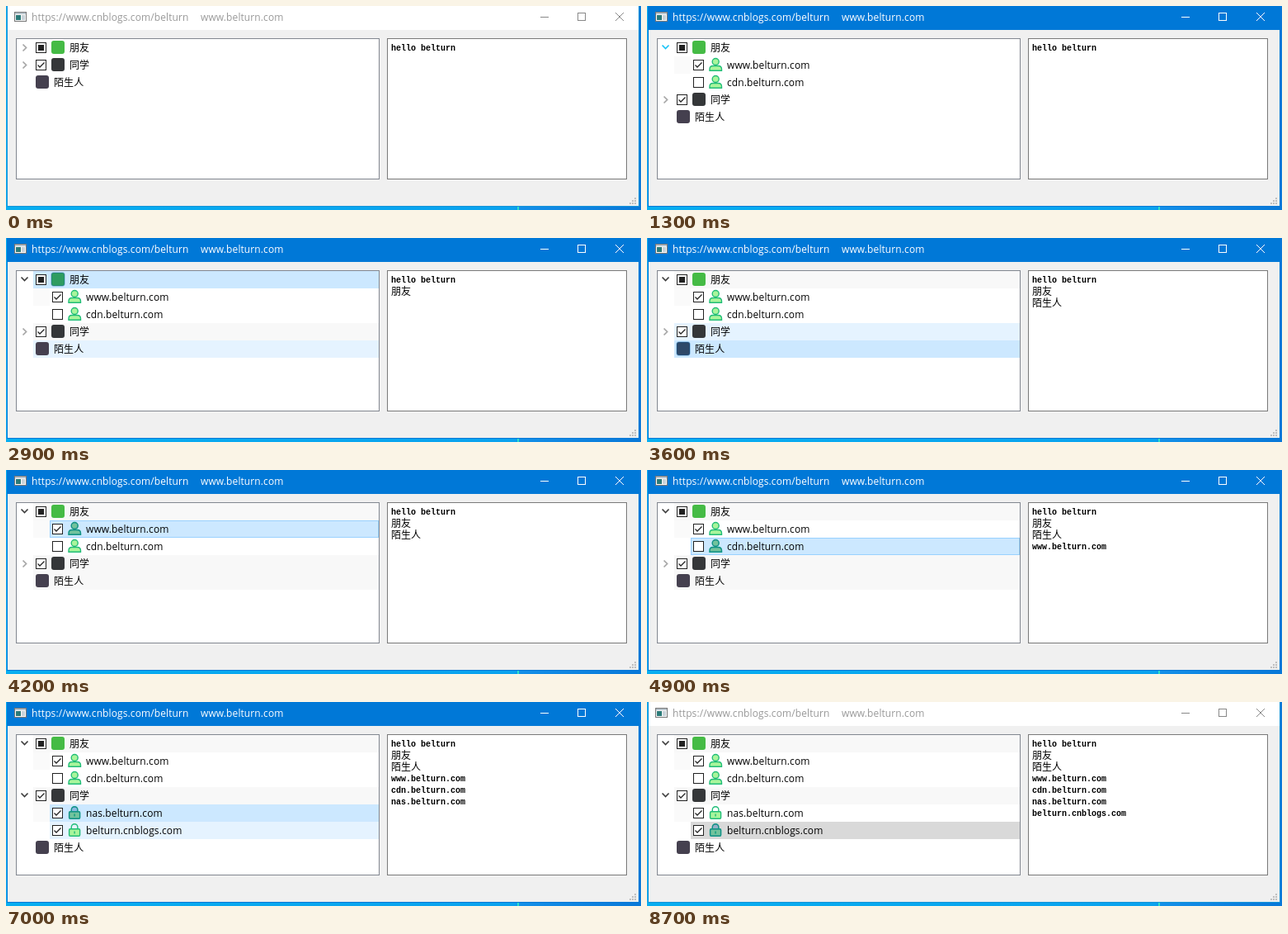
An HTML page with a canvas for the animation above (8800 ms loop, 770 by 247 pixels).

```html
<!DOCTYPE html>
<html lang="zh">
<head>
<meta charset="utf-8">
<style>
html, body { margin: 0; width: 100%; height: 100%; overflow: hidden; }
canvas { display: block; }
</style>
</head>
<body>
<canvas id="stage" width="770" height="247"></canvas>
<script>
const ctx = document.getElementById('stage').getContext('2d');
const LOOP = 8800, ROW = 21;
const UI_FONT = '12px "Open Sans", "Noto Sans CJK SC", "Noto Sans CJK", sans-serif';
const LOG_FONT = 'bold 10px "Liberation Mono", monospace';
const LOG_CJK_FONT = '12px "Noto Sans CJK SC", "Noto Sans CJK", sans-serif';

const items = {
  friend: { text: '朋友', check: 'partial', icon: '#45bb45' },
  www: { text: 'www.belturn.com', check: 'on', parent: 'friend', icon: 'person', ghost: true },
  cdn: { text: 'cdn.belturn.com', check: 'off', parent: 'friend', icon: 'person' },
  mate: { text: '同学', check: 'on', icon: '#353739' },
  nas: { text: 'nas.belturn.com', check: 'on', parent: 'mate', icon: 'lock', ghost: true },
  blog: { text: 'belturn.cnblogs.com', check: 'on', parent: 'mate', icon: 'lock' },
  other: { text: '陌生人', icon: '#45404f' }
};

// Each entry changes part of the state from its time on.
const events = [
  [0, { active: false, hover: null, arrow: null, selected: null }],
  [400, { hover: 'mate' }],
  [700, { hover: null, arrow: 'mate' }],
  [1000, { arrow: 'friend' }],
  [1300, { active: true, open: 'friend', repaint: 'mate' }],
  [1600, { arrow: null, hover: 'www' }],
  [1900, { hover: 'friend' }],
  [2000, { selected: 'friend' }],
  [2100, { log: 'friend' }],
  [2600, { hover: 'cdn' }],
  [2700, { hover: 'mate' }],
  [2900, { hover: 'other' }],
  [3100, { selected: 'other' }],
  [3200, { log: 'other' }],
  [3600, { hover: 'mate' }],
  [3700, { hover: 'cdn' }],
  [3800, { hover: 'www' }],
  [4200, { selected: 'www' }],
  [4300, { log: 'www' }],
  [4500, { hover: 'cdn' }],
  [4900, { selected: 'cdn' }],
  [5000, { log: 'cdn' }],
  [5200, { hover: 'mate' }],
  [5600, { hover: null, arrow: 'mate' }],
  [5900, { open: 'mate', repaint: 'other' }],
  [6000, { arrow: null, hover: 'mate' }],
  [6100, { hover: 'nas' }],
  [6700, { selected: 'nas', log: 'nas' }],
  [7000, { hover: 'blog' }],
  [7400, { selected: 'blog', log: 'blog' }],
  [7800, { hover: null }],
  [8700, { active: false }]
];

function stateAt(time) {
  const state = { open: new Set(), visited: new Set(), lines: ['hello belturn'] };
  for (const [start, { open, log, repaint, ...change }] of events) {
    if (start > time) break;
    Object.assign(state, change);
    if (open) state.open.add(open);
    if (log) state.lines.push(items[log].text);
    if (change.hover) state.visited.add(change.hover);
    if (repaint) state.visited.delete(repaint);
  }
  return state;
}

function box(x, y, w, h, fill, border) {
  ctx.fillStyle = fill;
  ctx.fillRect(x, y, w, h);
  if (!border) return;
  ctx.strokeStyle = border;
  ctx.lineWidth = 1;
  ctx.strokeRect(x + .5, y + .5, w - 1, h - 1);
}

function line(color, width, ...points) {
  ctx.strokeStyle = color;
  ctx.lineWidth = width;
  ctx.beginPath();
  for (const [x, y] of points) ctx.lineTo(x, y);
  ctx.stroke();
}

function label(text, x, y, color = '#000', font = UI_FONT, spacing = '0.1px') {
  ctx.font = font;
  ctx.letterSpacing = spacing;
  ctx.fillStyle = color;
  ctx.fillText(text, x, y);
}

function drawDesktop() {
  const sky = ctx.createLinearGradient(0, 0, 770, 0);
  sky.addColorStop(0, '#08aef0');
  sky.addColorStop(.8, '#0aa2ee');
  sky.addColorStop(.81, '#138fe8');
  sky.addColorStop(1, '#0878d8');
  box(0, 0, 770, 247, sky);
  box(620, 243, 2, 4, '#2fe0c8');
}

function drawWindow(active) {
  box(1, 0, 767, 243, active ? '#0078d7' : '#1593d8');
  box(2, 0, 765, 29, active ? '#0078d7' : '#fff');
  box(2, 29, 765, 213, '#f0f0f0');

  box(10, 7, 15, 12, '#f7f7f7', '#777');
  box(11, 8, 13, 2, '#b9c4cc');
  box(12, 11, 6, 6, '#2b7a78');
  box(19, 11, 4, 6, '#c9d3d9');

  const ink = active ? '#fff' : '#999';
  label('https://www.cnblogs.com/belturn', 31, 18, ink);
  label('www.belturn.com', 236, 18, ink);

  const mark = active ? '#fff' : '#888';
  line(mark, 1, [648, 13.5], [658, 13.5]);
  ctx.strokeRect(693.5, 8.5, 9, 9);
  line(mark, 1, [739, 8], [749, 18]);
  line(mark, 1, [749, 8], [739, 18]);

  box(12, 39, 441, 171, '#fff', '#828790');
  box(462, 39, 291, 171, '#fff', '#7a7a7a');

  for (let r = 0; r < 3; r++)
    for (let c = 2 - r; c < 3; c++) box(756 + c * 3, 232 + r * 3, 2, 2, '#bfbfbf');
}

function drawArrow(y, open, hot) {
  const points = open
    ? [[18.5, y + 7.5], [22.5, y + 11.5], [26.5, y + 7.5]]
    : [[20.5, y + 6.5], [24.5, y + 10.5], [20.5, y + 14.5]];
  line(hot ? '#1cc4f7' : open ? '#404040' : '#a6a6a6', 1.7, ...points);
}

function drawCheck(x, y, kind) {
  box(x, y, 13, 13, '#fff', '#222');
  if (kind === 'partial') box(x + 3, y + 3, 7, 7, '#222');
  if (kind === 'on') line('#222', 1.3, [x + 2.5, y + 6.5], [x + 5, y + 9], [x + 10.5, y + 3.5]);
}

// Selected icons get a translucent blue wash.
function paint(path, fill, stroke, tinted) {
  const layers = [[fill, stroke]];
  if (tinted) layers.push(['rgba(0,90,160,.32)', 'rgba(0,90,160,.32)']);
  ctx.lineWidth = 1.4;
  for (const [inside, edge] of layers) {
    if (inside) { ctx.fillStyle = inside; ctx.fill(path); }
    if (edge) { ctx.strokeStyle = edge; ctx.stroke(path); }
  }
}

function drawIcon(kind, x, y, tinted) {
  const green = '#20bd78', light = '#a9f59b';
  ctx.save();
  ctx.translate(x, y);
  if (kind === 'person') {
    paint(new Path2D('M1 15.3V13.5Q1 9.5 5 9.5H11.5Q15.5 9.5 15.5 13.5V15.3Z'), light, green, tinted);
    paint(new Path2D('M12.2 4.5A4 4 0 1 1 4.2 4.5A4 4 0 1 1 12.2 4.5Z'), light, green, tinted);
  } else if (kind === 'lock') {
    paint(new Path2D('M4.3 7V4.5A3.8 3.8 0 0 1 11.9 4.5V7'), null, green, tinted);
    paint(new Path2D('M2.8 6.8H13.4Q14.6 6.8 14.6 8V14Q14.6 15.3 13.4 15.3H2.8Q1.6 15.3 1.6 14V8Q1.6 6.8 2.8 6.8Z'), light, green, tinted);
    paint(new Path2D('M8.1 9.5V12.5'), null, green, tinted);
  } else {
    const tile = new Path2D();
    tile.roundRect(0, 0, 16, 16, 3);
    paint(tile, kind, null, tinted);
  }
  ctx.restore();
}

function drawRow(id, y, state) {
  const item = items[id];
  const left = item.parent ? 53 : 33;
  const hovered = state.hover === id, selected = state.selected === id;

  if (item.ghost) box(33, y, 20, ROW, '#fafafa');
  if (selected && !state.active) box(left, y, 452 - left, ROW, '#d9d9d9');
  else if (selected) box(left, y, 452 - left, ROW, '#cce8ff', hovered && '#99d1ff');
  else if (hovered) box(left, y, 452 - left, ROW, '#e5f3ff');
  else if (!item.parent && state.visited.has(id)) box(left, y, 452 - left, ROW, '#f8f8f8');

  let x = left + 3;
  if (!item.parent && item.check) drawArrow(y, state.open.has(id), state.arrow === id);
  if (item.check) {
    drawCheck(x, y + 4, item.check);
    x += 19;
  }
  drawIcon(item.icon, x, y + 2, selected);
  label(item.text, x + 22, y + 15);
}

function draw(time) {
  const state = stateAt(time);
  drawDesktop();
  drawWindow(state.active);
  Object.keys(items)
    .filter(id => !items[id].parent || state.open.has(items[id].parent))
    .forEach((id, i) => drawRow(id, 40 + i * ROW, state));
  state.lines.forEach((text, i) => {
    const latin = text.charCodeAt(0) < 128;
    label(text, 467, (latin ? 54 : 55) + i * 14, '#000', latin ? LOG_FONT : LOG_CJK_FONT, '0px');
  });
}

const start = performance.now();
function tick() {
  draw((performance.now() - start) % LOOP);
  requestAnimationFrame(tick);
}
tick();
</script>
</body>
</html>
```
